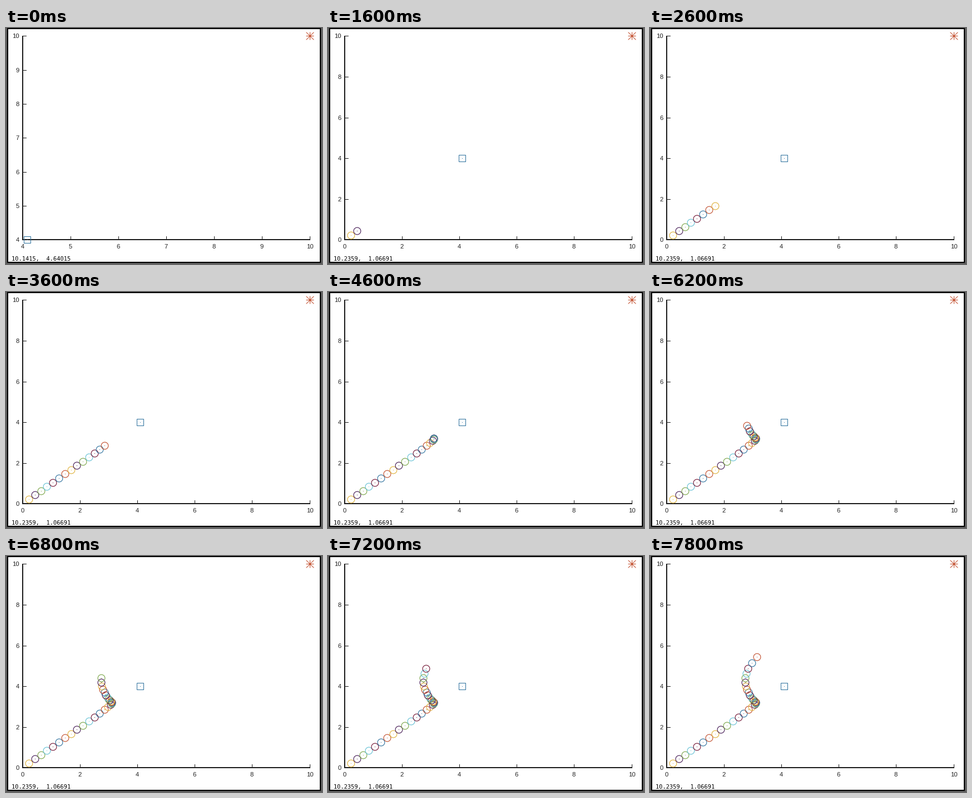
Write a matplotlib script that moves like this. It is 568x426 px and loops after 8 s.

```python
import math
import numpy as np
import matplotlib.pyplot as plt
from matplotlib.animation import FuncAnimation
from matplotlib.patches import Circle, Rectangle

W, H, DPI = 568, 426, 100
FRAMES, STEP_MS = 40, 200
PX = 72 / DPI
LEFT, RIGHT, TOP, BOTTOM = 30, 546, 14, 382
INK = "#1a1a1a"
BLUE, ORANGE = "#2a6f9c", "#c04a28"
PALETTE = [BLUE, ORANGE, "#deb036", "#401450", "#78a345", "#62c0d4", "#701030"]


def approach(steps=17):
    """Nearly straight run that brakes smoothly to a halt."""
    left = np.arange(steps, 0, -1)
    speed = 1 - np.exp(-left**2 / 17)
    f = np.concatenate([[0], np.cumsum(speed) / speed.sum()])
    return np.column_stack([41.5 + 149.5 * f,
                            374.5 - 109 * (0.965 * f + 0.035 * f**12)])


def swerve(steps=17):
    """Bend around the square, gaining speed."""
    s = np.linspace(0, 1, steps)**2.2
    return np.column_stack([190.5 - 78 * s + 80 * s**2, 264.5 - 82 * s])


PATH = np.vstack([approach(), swerve()])

fig = plt.figure(figsize=(W / DPI, H / DPI), dpi=DPI, facecolor="#5c5c5c")
ax = fig.add_axes([0, 0, 1, 1])


def box(x0, y0, x1, y1, color):
    ax.add_patch(Rectangle((x0, y0), x1 - x0, y1 - y0,
                           fc=color, ec="none", antialiased=False))


def label(x, y, text, ha="center"):
    ax.text(x, y, text, ha=ha, va="baseline", color="#202020",
            family="Liberation Sans", size=11.3 * PX)


def dot(x, y, color):
    box(int(x), int(y), int(x) + 1, int(y) + 1, color)


def to_px(x, y, low):
    scale = 10 - low
    return (LEFT + (x - low) / scale * (RIGHT - LEFT),
            BOTTOM - (y - low) / scale * (BOTTOM - TOP))


def draw_axes(low, step):
    box(29, TOP, 31, BOTTOM + 1, INK)
    box(29, BOTTOM - 1, RIGHT + 1, BOTTOM + 1, INK)
    for value in range(low, 11, step):
        x, y = to_px(value, value, low)
        x, y = math.floor(x), math.ceil(y)
        box(x, BOTTOM - 6, x + 1, BOTTOM, INK)
        box(LEFT, y, LEFT + 7, y + 1, INK)
        label(x, 398, str(value))
        label(24, y + 4, str(value), ha="right")


def draw_square(low):
    x, y = to_px(4.1, 4, low)
    x, y = math.floor(x + 0.4) + 0.5, round(y) + 0.5
    ax.add_patch(Rectangle((x - 6, y - 6), 12, 12, fill=False,
                           ec=BLUE, lw=PX, snap=False))
    dot(x, y, BLUE)


def draw_star(x, y, r=6.5):
    for dx, dy in [(r, 0), (0, r), (r, r), (r, -r)]:
        ax.plot([x - dx, x + dx], [y - dy, y + dy],
                color=ORANGE, lw=PX, snap=False)


def draw_circle(k):
    x, y = np.floor(PATH[k]) + 0.5
    color = PALETTE[(k + 2) % len(PALETTE)]
    ax.add_patch(Circle((x, y), 6.4, fill=False, ec=color,
                        lw=1.1 * PX, snap=False))
    dot(x, y, color)


def circle_count(i):
    """Circles appear from the seventh step on, slightly slower with time."""
    u = i - 8
    return min(len(PATH), max(0, math.floor(2.6 + 1.28 * u - 0.0068 * u * u)))


def update(i):
    ax.clear()
    ax.axis("off")
    ax.set_xlim(0, W)
    ax.set_ylim(H, 0)
    box(2, 0, 566, 424, "black")
    box(4, 2, 564, 422, "white")

    count = circle_count(i)
    low, step = (0, 2) if count else (4, 1)
    status = "10.2359,  1.06691" if count else "10.1415,  4.64015"
    draw_axes(low, step)
    draw_square(low)
    draw_star(RIGHT + 0.5, TOP + 0.5)
    for k in range(count):
        draw_circle(k)
    ax.text(10, 420, status, va="baseline", color="black",
            family="DejaVu Sans Mono", size=10.4 * PX)
    return []


anim = FuncAnimation(fig, update, frames=FRAMES, init_func=lambda: update(0),
                     interval=STEP_MS, repeat=True, repeat_delay=0)
plt.show()
```
